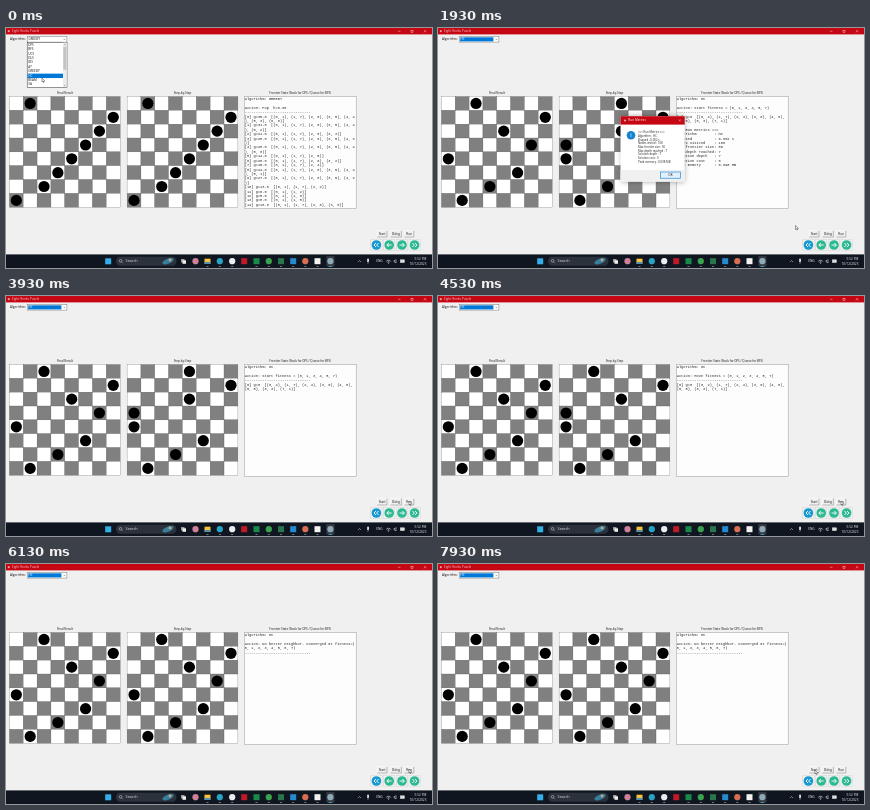
Write an HTML page with a canvas that moves like this. It is 426 px wide and 240 px high and loops after 8 s.

```html
<!DOCTYPE html>
<html lang="en">
<head>
<meta charset="utf-8">
<title>Eight Rooks Puzzle</title>
<style>
html, body { margin: 0; width: 100%; height: 100%; overflow: hidden; background: #f0f0f0; }
canvas { display: block; width: 100vw; height: 100vh; }
</style>
</head>
<body>
<canvas></canvas>
<script>
const W = 426, H = 240, LOOP = 8000;
const canvas = document.querySelector('canvas');
const ctx = canvas.getContext('2d');
const SANS = '"Open Sans", "Noto Sans", sans-serif';
const MONO = '"Liberation Mono", monospace';
const RED = '#c50613', BLUE = '#0078d7';
const CELL = 13.85, TOP = 68.5;

// Moments at which the application changes state, in ms.
const AT = { pick: 330, start: 1600, dialog: 1720, dismiss: 2740, run: 3780, step1: 4300, step2: 4800, done: 5270 };

function rect(x, y, w, h, fill, stroke, line = 0.5) {
  if (fill) { ctx.fillStyle = fill; ctx.fillRect(x, y, w, h); }
  if (stroke) { ctx.strokeStyle = stroke; ctx.lineWidth = line; ctx.strokeRect(x, y, w, h); }
}

function disc(x, y, r, fill) {
  ctx.fillStyle = fill;
  ctx.beginPath();
  ctx.arc(x, y, r, 0, 7);
  ctx.fill();
}

function path(points, color, width = 0.6) {
  ctx.strokeStyle = color;
  ctx.lineWidth = width;
  ctx.beginPath();
  points.forEach(([x, y]) => ctx.lineTo(x, y));
  ctx.stroke();
}

// Type is set ten times larger and scaled down to keep fractional advances.
function text(str, x, y, size = 3.1, color = '#111', align = 'left', family = SANS) {
  ctx.save();
  ctx.translate(x, y);
  ctx.scale(0.1, 0.1);
  ctx.font = `${size * 10}px ${family}`;
  ctx.textAlign = align;
  ctx.textBaseline = 'middle';
  ctx.fillStyle = color;
  ctx.fillText(str, 0, 0);
  ctx.restore();
}

const DASHES = '-'.repeat(30);
const rooks = cols => cols.map((col, row) => `(${row}, ${col})`).join(', ');

// Every frontier entry lists one column per row, starting from row 0.
const greedyFrontier = [
  [35, 1, 7, 6, 5, 4, 3, 0], [31, 1, 7, 6, 5, 4, 2], [21, 1, 7, 6, 3],
  [28, 1, 7, 6, 5, 3], [28, 1, 7, 6, 5, 4, 0], [14, 1, 7, 5],
  [20, 1, 7, 6, 2], [15, 1, 7, 4], [24, 1, 7, 6, 5, 4, 1],
  [27, 1, 7, 6, 5, 2], [13, 1, 7, 2], [6, 1, 2], [5, 1, 6],
  [8, 1, 5], [16, 1, 7, 6, 0]
].map(([g, ...cols], i) => `[${i}] g=${g}.0  [${rooks(cols)}]`);

const SOLVED = [2, 7, 4, 6, 0, 5, 3, 1];
const FIRST = [4, 7, 4, 0, 0, 5, 3, 1];
const SECOND = [2, ...FIRST.slice(1)];
const GREEDY = [1, 7, 6, 5, 4, 3, 2, 0];

const metrics = [
  ['Algorithm', 'HC'], ['Elapsed', '0.002 s'], ['Nodes visited', '168'],
  ['Max frontier size', '56'], ['Max depth reached', '7'],
  ['Solution depth', '7'], ['Solution cost', '0'], ['Peak memory', '0.098 MB']
];

function climbLog(action, cols) {
  const fitness = [...new Set(cols)].sort().join(', ');
  return ['Algorithm: HC', '', `Action: ${action} fitness = (${fitness})`, DASHES, `[0] g=0  [${rooks(cols)}]`];
}

const logs = {
  greedy: ['Algorithm: GREEDY', '', 'Action: Pop  h=0.00', DASHES, ...greedyFrontier],
  start: climbLog('Start', FIRST),
  step1: climbLog('Move', SECOND),
  step2: climbLog('Move', SOLVED),
  done: ['Algorithm: HC', '', 'Action: No better neighbor. Converged at fitness=(0, 1, 2, 3, 4, 5, 6, 7)', DASHES]
};
logs.metrics = [...logs.start, '', '=== Run metrics ===',
  ...metrics.map(([key, value]) => `${key.padEnd(17)}: ${value}`)];

function stateAt(t) {
  if (t < AT.pick) return { final: GREEDY, step: GREEDY, log: logs.greedy };
  if (t < AT.start) return { final: [], step: [], log: [] };
  const [step, log] =
    t < AT.run ? [FIRST, logs.metrics] :
    t < AT.step1 ? [FIRST, logs.start] :
    t < AT.step2 ? [SECOND, logs.step1] :
    t < AT.done ? [SOLVED, logs.step2] : [SOLVED, logs.done];
  return { final: SOLVED, step, log };
}

function board(left, cols) {
  for (let row = 0; row < 8; row++)
    for (let col = 0; col < 8; col++)
      rect(left + col * CELL, TOP + row * CELL, CELL, CELL, (row + col) % 2 ? '#808080' : '#fff', '#555', 0.25);
  cols.forEach((col, row) => disc(left + (col + 0.5) * CELL, TOP + (row + 0.5) * CELL, 5.6, '#000'));
}

function logPanel(lines) {
  rect(238.4, 68.5, 111.8, 111.8, '#fdfdfd', '#999', 0.5);
  const wrapped = lines.flatMap(line => line.match(/.{1,50}/g) || ['']);
  wrapped.forEach((line, i) => text(line.trimStart(), 238.7, 71 + i * 4.41, 3.67, '#222', 'left', MONO));
}

function titleBar() {
  rect(0, 0, W, 6.4, RED);
  disc(2.8, 3.2, 1.1, '#d9a0a4');
  text('Eight Rooks Puzzle', 6, 3.3, 3.15, '#f3c9cc');
  path([[392, 3.3], [394.5, 3.3]], '#fff', 0.4);
  rect(405, 2.3, 2, 2, null, '#fff', 0.4);
  path([[418, 2.2], [420.2, 4.4]], '#fff', 0.4);
  path([[420.2, 2.2], [418, 4.4]], '#fff', 0.4);
}

function algorithmPicker(open) {
  text('Algorithm:', 4, 11.3, 3.2);
  rect(21.3, 8.6, 39.6, 5.5, '#fff', '#777', 0.5);
  if (!open) rect(22.1, 9.3, 33.3, 4.1, BLUE);
  text(open ? 'GREEDY' : 'HC', 22.4, 11.4, 3.1, open ? '#111' : '#fff');
  path([[57.4, 10.8], [58.4, 11.8], [59.4, 10.8]], '#444', 0.45);
  if (!open) return;
  rect(21.2, 14.3, 39.8, 45, '#fff', '#333', 0.5);
  rect(57, 14.6, 3.7, 44.4, '#ececec');
  rect(57.3, 18.7, 3.1, 23, '#c4c4c4');
  path([[57.9, 17], [58.8, 16.1], [59.7, 17]], '#555', 0.4);
  path([[57.9, 56.8], [58.8, 57.7], [59.7, 56.8]], '#555', 0.4);
  ['DFS', 'BFS', 'UCS', 'DLS', 'IDS', 'A*', 'GREEDY', 'HC', 'BEAM', 'SA'].forEach((name, i) => {
    const y = 16.9 + i * 4.42, active = name === 'HC';
    if (active) rect(21.5, y - 2.2, 35.5, 4.4, BLUE);
    text(name, 22.2, y, 3.1, active ? '#fff' : '#111');
  });
}

function button(label, x, w, enabled) {
  rect(x, 202.6, w, 6.4, '#f0f0f0', '#fff', 0.4);
  path([[x, 209], [x + w, 209], [x + w, 202.6]], '#777', 0.5);
  text(label, x + w / 2, 205.7, 3.1, enabled ? '#111' : '#8c8c8c', 'center');
}

function stepButton(x, color, dir, double, enabled) {
  const y = 217;
  rect(x - 5.6, y - 5.6, 11.2, 11.2, '#f0f0f0', '#ccc', 0.4);
  ctx.globalAlpha = enabled ? 1 : 0.5;
  disc(x, y, 4.8, color);
  const head = tip => path([[tip - dir * 2, y - 2], [tip, y], [tip - dir * 2, y + 2]], '#fff', 0.9);
  head(x + dir * 2.4);
  if (double) head(x - dir * 0.2);
  else path([[x - dir * 2.4, y], [x + dir * 2.2, y]], '#fff', 0.9);
  ctx.globalAlpha = 1;
}

function controls(enabled) {
  button('Start', 371.2, 9.8, true);
  button('Dừng', 384.4, 11, enabled);
  button('Run', 398.4, 9.4, enabled);
  stepButton(370.4, '#169bd0', -1, true, enabled);
  stepButton(383.2, '#2dba93', -1, false, enabled);
  stepButton(396, '#2dba93', 1, false, enabled);
  stepButton(408.6, '#2dba93', 1, true, enabled);
}

function taskbar() {
  rect(0, 226.4, W, 13.6, '#101620');
  rect(99.2, 230.3, 6, 6, '#35aee8');
  ctx.fillStyle = '#2c323b';
  ctx.beginPath();
  ctx.roundRect(110, 228.7, 60.5, 9, 4.5);
  ctx.fill();
  ctx.strokeStyle = '#ddd';
  ctx.lineWidth = 0.5;
  ctx.beginPath();
  ctx.arc(114.6, 232.8, 1.3, 0, 7);
  ctx.stroke();
  path([[115.5, 233.8], [116.6, 234.9]], '#ddd', 0.5);
  text('Search', 119.5, 233.3, 3.9, '#ddd');
  ctx.fillStyle = '#397f9d';
  ctx.beginPath();
  ctx.ellipse(162, 233.2, 6, 2.5, -0.4, 0, 7);
  ctx.fill();
  disc(164, 232, 1.4, '#c2a98b');

  rect(320.3, 228.2, 8.2, 10, '#343b44');
  rect(175, 231, 3.5, 3.5, '#999');
  rect(176.5, 232.3, 3.5, 3.5, '#eee');
  rect(198.5, 230.7, 6, 5, '#f8c43d');
  rect(198.5, 234, 6, 1.7, '#3b91cb');
  const apps = [
    [189.5, '#cf819b'], [213.8, '#27a3c4'], [226.2, '#e8eef0'],
    [238.2, '#bd1927', 1], [250.5, '#188a4d', 1], [262.8, '#39a34e'],
    [275, '#28764d', 1], [287.2, '#2789d0', 1], [299.3, '#d66f54'],
    [311.5, '#f2f2f2', 1], [324.4, '#8fa9b8']
  ];
  apps.forEach(([x, color, square]) => square ? rect(x - 3, 230.2, 6, 6, color) : disc(x, 233.2, 3.1, color));
  [201.5, 213.8, 226.2, 250.5, 262.8, 275, 287.2, 299.3, 311.5].forEach(x => rect(x - 1, 238.2, 2, 0.7, '#9aa0a7'));
  rect(322.4, 238.2, 4, 0.7, '#55b8e8');

  path([[352, 234], [353.5, 232.5], [355, 234]], '#eee', 0.5);
  rect(361.2, 230.7, 1.7, 3.2, '#eee');
  path([[362, 234], [362, 236]], '#eee', 0.4);
  text('ENG', 373.4, 233.3, 3.2, '#eee', 'center');
  ctx.strokeStyle = '#eee';
  ctx.lineWidth = 0.6;
  [1.3, 2.8].forEach(r => {
    ctx.beginPath();
    ctx.arc(382.5, 235, r, Math.PI * 1.2, Math.PI * 1.8);
    ctx.stroke();
  });
  disc(382.5, 235, 0.5, '#eee');
  path([[388, 232.5], [389, 232.5], [390, 231.5], [390, 235], [389, 234], [388, 234], [388, 232.5]], '#eee', 0.5);
  rect(394.3, 231.8, 4.2, 2.8, '#ddd', '#eee', 0.4);
  text('5:52 PM', 420.5, 230.8, 3.2, '#eee', 'right');
  text('10/12/2025', 420.5, 235.7, 3.2, '#eee', 'right');
}

const clamp = v => Math.max(0, Math.min(1, v));

function dialog(t) {
  const fadeIn = clamp((t - AT.dialog) / 150);
  const fadeOut = clamp((AT.dismiss + 210 - t) / 210);
  const alpha = Math.min(fadeIn, fadeOut);
  if (!alpha) return;
  const scale = 0.93 + 0.07 * alpha;
  ctx.save();
  ctx.globalAlpha = Math.min(1, alpha * 1.1);
  ctx.translate(214.6, 121);
  ctx.scale(scale, scale);
  ctx.translate(-214.6, -121);
  ctx.shadowColor = 'rgba(0,0,0,.35)';
  ctx.shadowBlur = 5;
  rect(182.5, 88.2, 64.2, 65.4, '#fff');
  ctx.shadowColor = 'transparent';
  rect(182.5, 88.2, 64.2, 8.4, RED);
  disc(187, 92.4, 1, '#e5b8bb');
  text('Run Metrics', 190.2, 92.6, 3.2, '#fff');
  path([[240.8, 91.4], [242.8, 93.4]], '#fff', 0.4);
  path([[242.8, 91.4], [240.8, 93.4]], '#fff', 0.4);
  disc(193, 107.2, 4.3, '#1683cf');
  text('i', 193, 107.2, 6, '#fff', 'center');
  ['=== Run Metrics ===', ...metrics.map(([key, value]) => `${key} : ${value}`)]
    .forEach((line, i) => text(line, 200, 104.6 + i * 3.65, 2.8, '#222'));
  rect(182.5, 142, 64.2, 11.6, '#f0f0f0');
  rect(222.5, 144, 20, 6.2, '#e3f0fa', BLUE, 0.6);
  text('OK', 232.5, 147.2, 3.1, '#111', 'center');
  ctx.restore();
}

// Pointer stops: time, x, y.
const stops = [
  [0, 36, 50], [150, 36, 48.5], [400, 36, 48.5], [1200, 373, 180], [1450, 376, 205],
  [1780, 376, 205], [2450, 233, 147], [2850, 233, 147], [3600, 403, 205],
  [6100, 403, 205], [6700, 390, 206], [7200, 390, 206], [7700, 377, 206], [LOOP, 377, 206]
];

function pointer(t) {
  const i = stops.findIndex(stop => t < stop[0]);
  const [t0, x0, y0] = stops[i - 1], [t1, x1, y1] = stops[i];
  const p = (t - t0) / (t1 - t0), ease = p * p * (3 - 2 * p);
  ctx.save();
  ctx.translate(x0 + (x1 - x0) * ease, y0 + (y1 - y0) * ease);
  ctx.beginPath();
  [[0, 0], [0, 4], [0.9, 3.2], [1.5, 4.6], [2.1, 4.3], [1.6, 3], [2.8, 2.9]].forEach(([x, y]) => ctx.lineTo(x, y));
  ctx.closePath();
  ctx.fillStyle = '#fff';
  ctx.fill();
  ctx.strokeStyle = '#111';
  ctx.lineWidth = 0.4;
  ctx.stroke();
  ctx.restore();
}

function draw(t) {
  const state = stateAt(t);
  rect(0, 0, W, H, '#f0f0f0');
  titleBar();
  text('Final Result', 59, 65.4, 3, '#111', 'center');
  text('Step-by-Step', 176.5, 65.4, 3, '#111', 'center');
  text('Frontier State (Stack for DFS / Queue for BFS)', 294.2, 65.4, 2.95, '#111', 'center');
  board(3.4, state.final);
  board(121.1, state.step);
  logPanel(state.log);
  algorithmPicker(t < AT.pick);
  controls(t < AT.pick || t >= AT.start);
  taskbar();
  dialog(t);
  pointer(t);
}

function frame(now) {
  const ratio = window.devicePixelRatio || 1;
  const w = Math.round(innerWidth * ratio), h = Math.round(innerHeight * ratio);
  if (canvas.width !== w || canvas.height !== h) Object.assign(canvas, { width: w, height: h });
  ctx.setTransform(w / W, 0, 0, h / H, 0, 0);
  draw(now % LOOP);
  requestAnimationFrame(frame);
}
requestAnimationFrame(frame);
</script>
</body>
</html>
```
